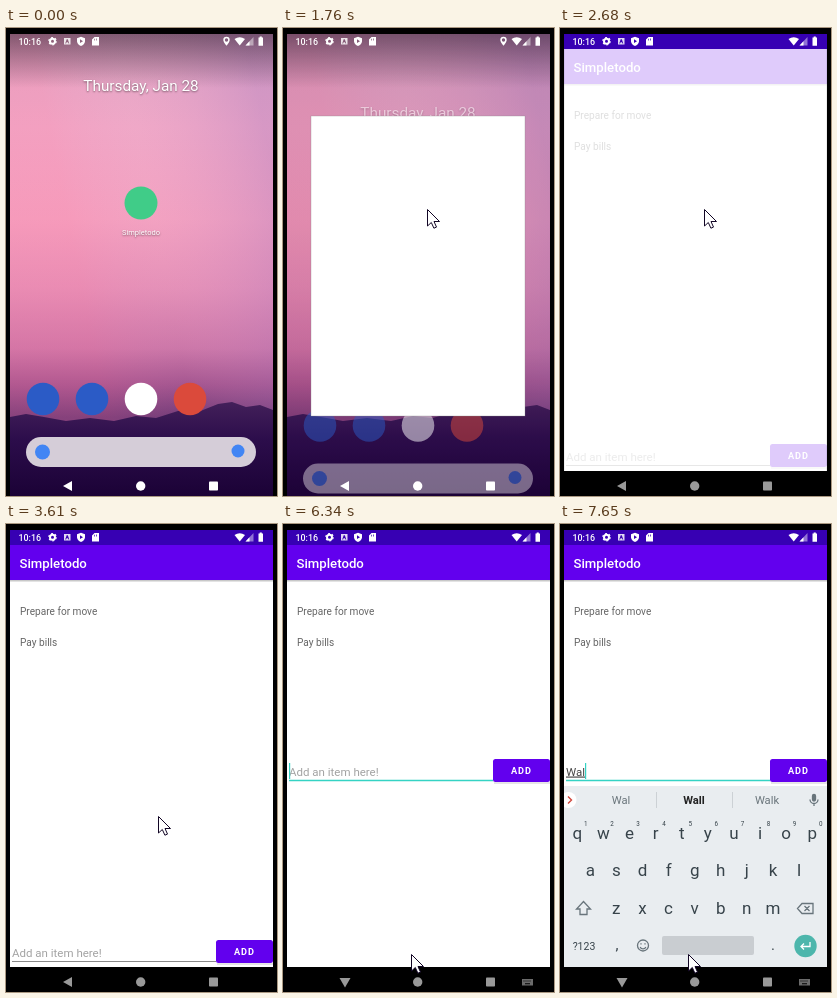
Recreate the animation shown at these times as an HTML page. Size 271 px wide and 468 px high, loop 8000 ms.

```html
<!DOCTYPE html>
<html lang="en">
<head>
<meta charset="utf-8">
<title>Simpletodo walkthrough</title>
<style>
  html, body { margin: 0; width: 100%; height: 100%; overflow: hidden; background: #000; }
  svg { display: block; width: 271px; height: 468px; font-family: Roboto, sans-serif; }
  .mid { text-anchor: middle; }
  .shade { text-shadow: 0 1px 2px #0007; }
</style>
</head>
<body>
<svg viewBox="0 0 271 468">
  <defs>
    <linearGradient id="sky" x1="0" y1="0" x2="0" y2="1">
      <stop offset="0" stop-color="#dfa6c4"/>
      <stop offset=".2" stop-color="#f0a9c7"/>
      <stop offset=".4" stop-color="#f4a2c0"/>
      <stop offset=".55" stop-color="#e48fb6"/>
      <stop offset=".68" stop-color="#c973a5"/>
      <stop offset=".76" stop-color="#9c4d89"/>
      <stop offset=".83" stop-color="#64306f"/>
    </linearGradient>
    <linearGradient id="haze" x1="0" y1=".65" x2="1" y2=".35">
      <stop offset=".25" stop-color="#ff7fa8" stop-opacity=".22"/>
      <stop offset=".55" stop-color="#e9a0cc" stop-opacity=".1"/>
      <stop offset="1" stop-color="#a878c0" stop-opacity=".35"/>
    </linearGradient>
    <linearGradient id="scrim" x1="0" y1="0" x2="0" y2="1">
      <stop offset="0" stop-color="#201020" stop-opacity=".5"/>
      <stop offset="1" stop-color="#201020" stop-opacity="0"/>
    </linearGradient>
    <linearGradient id="hill" x1="0" y1="0" x2="0" y2="1">
      <stop offset="0" stop-color="#43205a"/>
      <stop offset=".4" stop-color="#2c0d4b"/>
      <stop offset="1" stop-color="#1b0236"/>
    </linearGradient>
    <clipPath id="screen"><path d="M4 6H267V468H4Z"/></clipPath>
    <clipPath id="aboveNav"><path d="M4 6H267V443H4Z"/></clipPath>
  </defs>
  <rect width="271" height="468"/>
  <g clip-path="url(#screen)">
    <path d="M4 6H267V468H4Z" fill="url(#sky)"/>
    <path d="M4 6H267V400H4Z" fill="url(#haze)"/>
    <path d="M4 6H267V60H4Z" fill="url(#scrim)"/>
    <path d="M4 389L20 386 38 389 60 393 84 390 108 393 130 388 150 390 172 383 192 384 212 376 226 374 240 379 254 377 267 382V468H4Z" fill="url(#hill)"/>
    <rect id="dim" x="4" y="6" width="263" height="462" fill="#26083c" opacity="0"/>
    <g id="home">
      <text class="mid shade" x="135" y="63" font-size="15.3" fill="#fff">Thursday, Jan 28</text>
      <circle id="appIcon" cx="135" cy="175" r="16.5" fill="#40cc88"/>
      <text class="mid shade" x="135" y="207" font-size="7.5" fill="#fff">Simpletodo</text>
      <circle cx="37" cy="371" r="16.3" fill="#2b5bc6"/>
      <circle cx="86" cy="371" r="16.3" fill="#2b5bc6"/>
      <circle cx="135" cy="371" r="16.3" fill="#fff"/>
      <circle cx="184" cy="371" r="16.3" fill="#db4a3b"/>
      <rect x="20" y="409" width="230" height="30" rx="15" fill="#d5cdd8"/>
      <circle cx="36.5" cy="424" r="7.5" fill="#4285f4"/>
      <circle cx="232" cy="423" r="6.5" fill="#4285f4"/>
    </g>
    <rect id="splash" fill="#fff" stroke="#8888" stroke-width=".6"/>
    <g id="bars">
      <path d="M4 6H267V21H4Z" fill="#3700b3"/>
      <path d="M4 443H267V468H4Z"/>
    </g>

    <g id="app" clip-path="url(#aboveNav)">
      <path d="M4 21H267V443H4Z" fill="#fff"/>
      <path d="M4 56H267V57.5H4Z" fill="#c8c8c8"/>
      <path d="M4 21H267V56H4Z" fill="#6200ee"/>
      <text x="13.5" y="44" font-size="13.2" font-weight="500" fill="#fff">Simpletodo</text>
      <g font-size="10.1" fill="#666">
        <text x="14" y="90.5">Prepare for move</text>
        <text x="14" y="121.5">Pay bills</text>
      </g>
      <g id="entry">
        <text id="hint" x="6" y="432.5" font-size="11.5" fill="#a3a3a3">Add an item here!</text>
        <text id="typed" x="6" y="432.5" font-size="11.5" fill="#444" text-decoration="underline"></text>
        <path d="M6 437.5H210" stroke="#8a8a8a"/>
        <path id="focusLine" d="M6 437.5H210" stroke="#35d3c4" stroke-width="1.6"/>
        <rect id="caret" y="420" width="1.2" height="16" fill="#35d3c4"/>
        <path d="M211 440H267" stroke="#ccc"/>
        <rect x="210" y="416" width="57" height="23" rx="2.5" fill="#6200ee"/>
        <text x="228" y="431" font-size="9.2" font-weight="700" letter-spacing=".9" fill="#fff">ADD</text>
      </g>
      <g id="keyboard" fill="#37434a">
        <path d="M4 262H267V443H4Z" fill="#e9edf0"/>
        <circle cx="8.500" cy="276" r="8" fill="#fff"/>
        <path d="M8 272.500L11.500 276 8 279.500" fill="none" stroke="#d0453a" stroke-width="1.400"/>
        <g id="suggestions" class="mid" font-size="11.2">
          <text x="61" y="280" fill="#6a757b"></text>
          <text x="134" y="280" font-weight="700" fill="#222"></text>
          <text x="207" y="280" fill="#6a757b"></text>
          <path d="M96.500 268V284M172.500 268V284" stroke="#ccd1d5"/>
        </g>
        <g fill="none" stroke="#68747b" stroke-width="1.300">
          <rect x="252.500" y="270.500" width="3" height="6.500" rx="1.500" fill="#68747b"/>
          <path d="M250 275.500a4 4 0 0 0 8 0M254 279.500V282"/>
          <path id="shift" d="M23.500 377.500L30.500 385H27V390.500H20V385H16.500Z"/>
          <path d="M242 379.500H253V389.500H242L237.500 384.500ZM244.500 382L249.500 387M249.500 382L244.500 387"/>
          <circle cx="83" cy="421.500" r="5.500"/>
          <path d="M80.200 423a3 3 0 0 0 5.600 0M81 419.200v1.400M85 419.200v1.400"/>
        </g>
        <g id="keys" class="mid"></g>
        <text class="mid" x="24" y="425.500" font-size="10.5">?123</text>
        <text class="mid" x="57" y="426" font-size="15">,</text>
        <text class="mid" x="213" y="426" font-size="15">.</text>
        <rect x="102" y="412" width="92" height="19" rx="2" fill="#c9cdd1"/>
        <circle cx="245.500" cy="422" r="11.200" fill="#4db6ac"/>
        <path d="M250 418V422.500H241M244 419.500L241 422.500 244 425.500" fill="none" stroke="#fff" stroke-width="1.300"/>
      </g>
    </g>

    <g fill="#fff">
      <text x="12.500" y="16.700" font-size="8.900" font-weight="500">10:16</text>
      <circle cx="46.500" cy="13.200" r="2.500" fill="none" stroke="#fff" stroke-width="2"/>
      <circle cx="46.500" cy="13.200" r="3.700" fill="none" stroke="#fff" stroke-width="1.200" stroke-dasharray="1.940"/>
      <path d="M58 10H64.500V16.500H58ZM59.200 15.500H60.100L60.600 14.300H62L62.400 15.500H63.300L61.800 11.200H60.700Z" fill-rule="evenodd" opacity=".85"/>
      <path d="M75 8.700L79 10.200V13.500Q78.500 16.500 75 18Q71.500 16.500 71 13.500V10.200ZM74 11.300V15L77 13.200Z" fill-rule="evenodd"/>
      <path d="M88.500 9H93V17.500H86V11.500ZM88.300 10.700V12.500H89V10.700ZM90 10.500V12.500H90.700V10.500Z" fill-rule="evenodd"/>
      <path id="pin" d="M220.500 17.800Q217.300 14 217.300 12A3.200 3.200 0 0 1 223.700 12Q223.700 14 220.500 17.800ZM220.500 10.300A1.700 1.700 0 1 0 220.500 13.700A1.700 1.700 0 1 0 220.500 10.300Z" fill-rule="evenodd"/>
      <path d="M228.500 11Q233.700 7.500 239 11L233.700 17.500Z"/>
      <path d="M247.500 9V17.500H239.500Z" opacity=".45"/>
      <path d="M243.500 13.200V17.500H239.500Z"/>
      <path d="M252.500 9.500H253.700V8.500H255.800V9.500H257V17.700H252.500Z"/>
    </g>
    <g id="nav" fill="#fff">
      <path id="back" d="M66 453V463L57 458Z"/>
      <circle cx="134.700" cy="458" r="4.700"/>
      <rect x="203" y="453.500" width="9" height="9" rx=".8"/>
      <path id="keysIcon" d="M239 455H250V461.500H239ZM240.500 456.500v1h1v-1zm2 0v1h1v-1zm2 0v1h1v-1zm2 0v1h1v-1zM242 459.300v1h5v-1z" fill-rule="evenodd" opacity=".7"/>
    </g>
  </g>
  <path id="mouse" d="M0 0V16.500L3.800 13 6.400 18.700 9 17.600 6.500 12H12Z" fill="#fff" stroke="#120625" stroke-linejoin="round"/>
</svg>
<script>
const LOOP = 8000;
const $ = id => document.getElementById(id);
const set = (id, attrs) => Object.entries(attrs).forEach(([k, v]) => $(id).setAttribute(k, v));
const show = (id, on) => set(id, { visibility: on ? 'visible' : 'hidden' });
const mix = (a, b, p) => a + (b - a) * p;

// Progress 0..1 in n held steps, the first at `from`, the last at `to`.
function steps(t, from, to, n) {
  if (t < from) return 0;
  if (t >= to) return 1;
  return (Math.floor((t - from) / (to - from) * (n - 1) + 1e-3) + 1) / n;
}
const latest = (list, t) => list.filter(item => item[0] <= t).pop();

// Mouse moves: from, to, steps, x, y
const moves = [
  [210, 370, 3, 158, 235],
  [600, 1060, 7, 133, 170],
  [1140, 1360, 4, 144, 181],
  [3610, 3610, 1, 152, 292],
  [3690, 3920, 4, 156, 365],
  [4000, 4230, 4, 130, 438],
  [4460, 4690, 4, 128, 430]
];
// Opening window: time, x, y, width, height, launcher shift, launcher opacity
const opening = [
  [0, 0, 0, 0, 0, 0, 1],
  [1680, 72, 130, 126, 150, 9, .85],
  [1760, 28, 88, 214, 300, 26.5, .5],
  [1840, 11, 38, 249, 398, 38, .15],
  [1910, 4, 6, 263, 462, 44, 0]
];
// Typing: time, text, caret x, suggestions
const typing = [
  [0, '', 6, ['', '', '']],
  [7120, 'W', 16, ['W', 'We', 'What']],
  [7500, 'Wa', 22, ['Wa', 'Was', 'Want']],
  [7650, 'Wal', 25, ['Wal', 'Wall', 'Walk']]
];

const keyRows = [['qwertyuiop', 17.3, 314.5], ['asdfghjkl', 30.3, 352], ['zxcvbnm', 56.3, 390]];
const letters = [];
function addKey(text, x, y, size) {
  const key = document.createElementNS('http://www.w3.org/2000/svg', 'text');
  key.textContent = text;
  $('keys').append(key);
  for (const [k, v] of Object.entries({ x, y, 'font-size': size })) key.setAttribute(k, v);
  return key;
}
keyRows.forEach(([row, x, y], r) => [...row].forEach((letter, i) => {
  const keyX = x + i * 26.1;
  letters.push([letter, addKey(letter, keyX, y, 17)]);
  if (r === 0) addKey((i + 1) % 10, keyX + 8.5, 301.5, 6.3);
}));

function drawMouse(t) {
  let x = 241, y = 439;
  for (const [from, to, n, toX, toY] of moves) {
    const p = steps(t, from, to, n);
    x = mix(x, toX, p);
    y = mix(y, toY, p);
  }
  show('mouse', t >= 130);
  set('mouse', { transform: `translate(${x + .5} ${y + .5})` });
}

function drawLauncher(t) {
  const [, x, y, width, height, shift, opacity] = latest(opening, t);
  set('splash', { x, y, width, height });
  set('home', { transform: `translate(0 ${shift})`, opacity });
  set('dim', { opacity: (1 - opacity) * .2 });
  set('appIcon', { r: 16.5 + steps(t, 1440, 1610, 3) });
  set('bars', { opacity: steps(t, 1910, 2070, 3) });
}

function drawApp(t) {
  const [, text, caretX, words] = latest(typing, t);
  const focus = steps(t, 5010, 5160, 3);
  set('app', { opacity: steps(t, 2680, 2990, 5) });
  show('pin', t < 2680);
  set('entry', { transform: `translate(0 ${t < 6290 ? 0 : -181})` });
  set('focusLine', { opacity: focus });
  set('caret', { x: caretX, opacity: (t >= 5010 && t < 5620) || t >= 6290 ? 1 : 0 });
  show('hint', !text);
  $('typed').textContent = text;

  show('keyboard', t >= 6570);
  const rise = steps(t, 6570, 6720, 3);
  set('keyboard', { transform: `translate(0 ${181 * (1 - rise) ** 2})` });
  const caps = t < 7190;
  set('shift', { fill: caps ? '#68747b' : 'none' });
  for (const [letter, key] of letters) key.textContent = caps ? letter.toUpperCase() : letter;
  set('suggestions', { opacity: text ? 1 : 0 });
  $('suggestions').querySelectorAll('text').forEach((el, i) => el.textContent = words[i]);
}

function drawNav(t) {
  const typingMode = t >= 5790;
  set('nav', { opacity: mix(1, .6, steps(t, 2300, 2450, 3)) });
  set('back', { d: typingMode ? 'M56.500 454H67.500L62 463.500Z' : 'M66 453V463L57 458Z' });
  show('keysIcon', typingMode);
}

function frame(now) {
  const t = now % LOOP;
  drawLauncher(t);
  drawApp(t);
  drawNav(t);
  drawMouse(t);
  requestAnimationFrame(frame);
}
frame(0);
</script>
</body>
</html>
```
